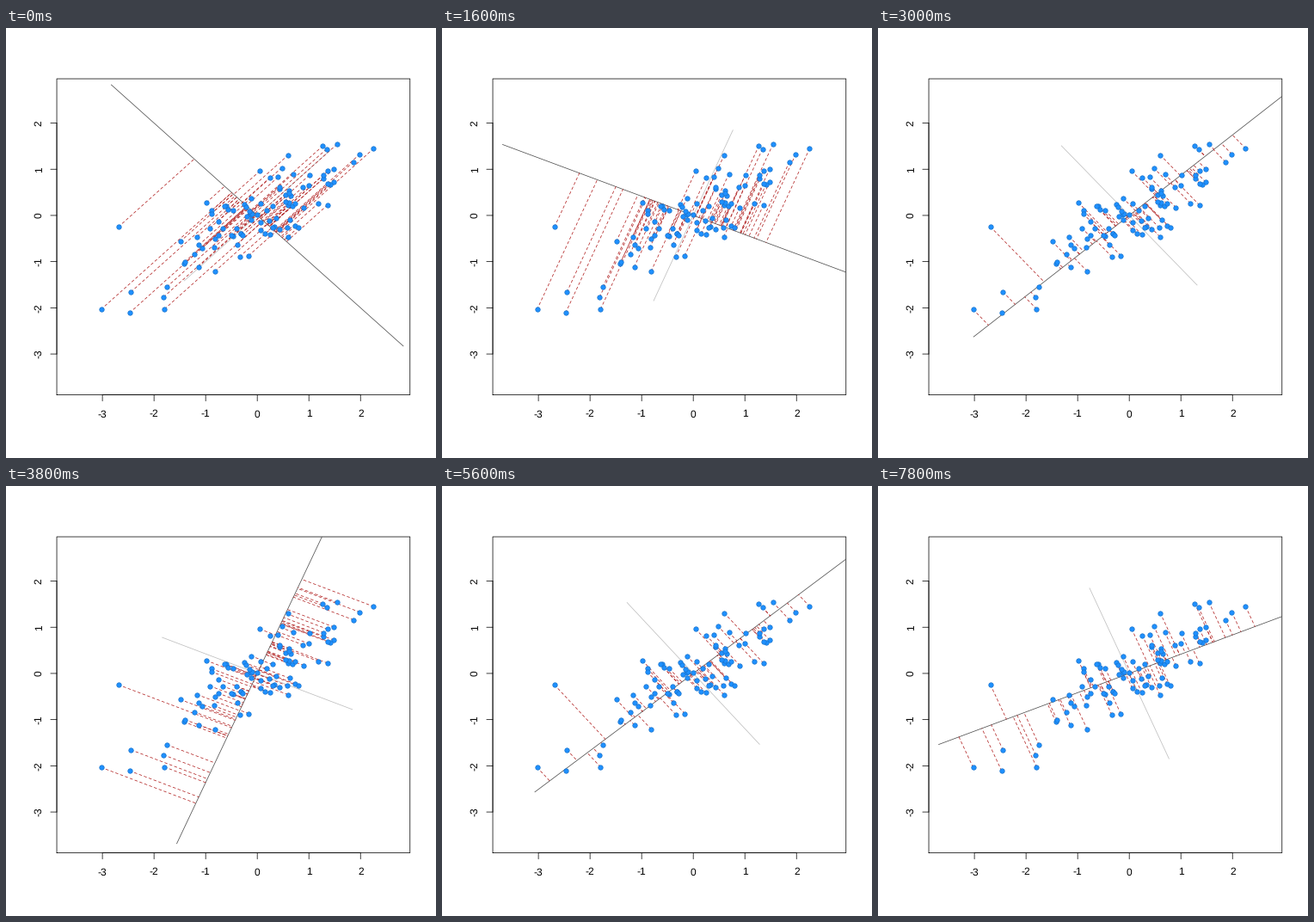
Recreate the animation shown at these times as a matplotlib script. Size 500x500 px, loop 8000 ms.

```python
import math
import random

import numpy as np
import matplotlib.pyplot as plt
from matplotlib.animation import FuncAnimation
from matplotlib.collections import LineCollection

plt.rcParams["text.hinting"] = "no_hinting"

SIZE, DPI = 500, 100
PX = 72 / DPI                       # points per pixel
LEFT, RIGHT, TOP, BOTTOM = 59.04, 469.76, 59.04, 426.56
FRAMES, INTERVAL = 40, 200
THIN = 0.75 * PX


def twister(seed):
    """Mersenne Twister seeded with a linear congruential scrambler, as in R."""
    state = []
    for i in range(675):
        seed = (69069 * seed + 1) % 2**32
        if i > 50:
            state.append(seed)
    rng = random.Random(seed)
    rng.setstate((3, tuple(state) + (624,), None))
    return rng


def normal_quantile(p):
    x = 0.0
    for _ in range(60):
        cdf = 0.5 * math.erfc(-x / math.sqrt(2))
        x += (p - cdf) * math.sqrt(2 * math.pi) * math.exp(x * x / 2)
    return x


def rnorm(rng, n):
    big = 2**27
    out = []
    for _ in range(n):
        high = int(big * (rng.getrandbits(32) / 2**32))
        low = rng.getrandbits(32) / 2**32
        p = (high + low) / big
        out.append(normal_quantile(p) if p < 0.5 else -normal_quantile(1 - p))
    return np.array(out)


def make_points():
    z = rnorm(twister(42), 200).reshape(2, 100).T
    z -= z.mean(axis=0)
    return z @ np.linalg.cholesky([[1, 0.6], [0.6, 0.6]]).T


def axis_of(angle):
    a = math.radians(angle)
    return np.array([math.cos(a), math.sin(a)])


def swing(points):
    """Angles of a damped rod pulled by springs towards the points."""
    angle, speed, angles = -45.0, 0.0, []
    for _ in range(FRAMES):
        angles.append(angle)
        w = axis_of(angle)
        torque = np.sum((points @ w) * (points @ [-w[1], w[0]]))
        speed = (speed + torque / 40) * 0.93
        angle += speed
    return angles


points = make_points()
angles = swing(points)

lo, hi = 1.2 * points[:, 0].min(), 1.2 * points[:, 0].max()
pad = 0.04 * (hi - lo)
lo, hi = lo - pad, hi + pad

fig = plt.figure(figsize=(SIZE / DPI, SIZE / DPI), dpi=DPI, facecolor="white")
page = fig.add_axes([0, 0, 1, 1])
page.set(xlim=(0, SIZE), ylim=(SIZE, 0))
page.axis("off")
ax = fig.add_axes([LEFT / SIZE, 1 - BOTTOM / SIZE,
                   (RIGHT - LEFT) / SIZE, (BOTTOM - TOP) / SIZE])
ax.set(xlim=(lo, hi), ylim=(lo, hi))
ax.axis("off")


def stroke(xs, ys):
    page.plot(xs, ys, color="black", lw=THIN, solid_capstyle="round",
              solid_joinstyle="round", snap=False)


def label(x, y, value, rotation=0):
    page.text(x, y, str(value), family="Liberation Sans", size=12 * PX,
              ha="center", va="baseline", rotation=rotation,
              rotation_mode="anchor")


stroke([LEFT, RIGHT, RIGHT, LEFT, LEFT], [BOTTOM, BOTTOM, TOP, TOP, BOTTOM])
ticks = np.arange(-3, 3)
part = (ticks - lo) / (hi - lo)
tick_x = LEFT + part * (RIGHT - LEFT)
tick_y = BOTTOM - part * (BOTTOM - TOP)
stroke(tick_x[[0, -1]], [BOTTOM, BOTTOM])
stroke([LEFT, LEFT], tick_y[[0, -1]])
for v, x, y in zip(ticks, tick_x, tick_y):
    stroke([x, x], [BOTTOM, BOTTOM + 7.2])
    stroke([LEFT, LEFT - 7.2], [y, y])
    label(x, 452.5, v)
    label(41.8, y, v, 90)

rod, = ax.plot([], [], color="#4d4d4d", lw=THIN, zorder=2, snap=False)
cross, = ax.plot([], [], color="#bebebe", lw=THIN, zorder=1, snap=False)
springs = LineCollection([], colors="firebrick", linewidths=THIN,
                         linestyles=[(0, (4, 4))], capstyle="round", zorder=3)
ax.add_collection(springs, autolim=False)
ax.plot(*points.T, "o", ms=5.4 * PX, mfc="dodgerblue", mec="#1874cd",
        mew=THIN, zorder=4, snap=False)


def draw(i):
    w = axis_of(angles[i])
    n = np.array([-w[1], w[0]])
    rod.set_data(*np.outer(w, [-4, 4]))
    cross.set_data(*np.outer(n, [-2, 2]))
    feet = np.outer(points @ w, w)
    springs.set_segments(np.stack([points, feet], axis=1))
    return rod, cross, springs


anim = FuncAnimation(fig, draw, frames=FRAMES, interval=INTERVAL,
                     repeat=True, repeat_delay=0)
plt.show()
```
